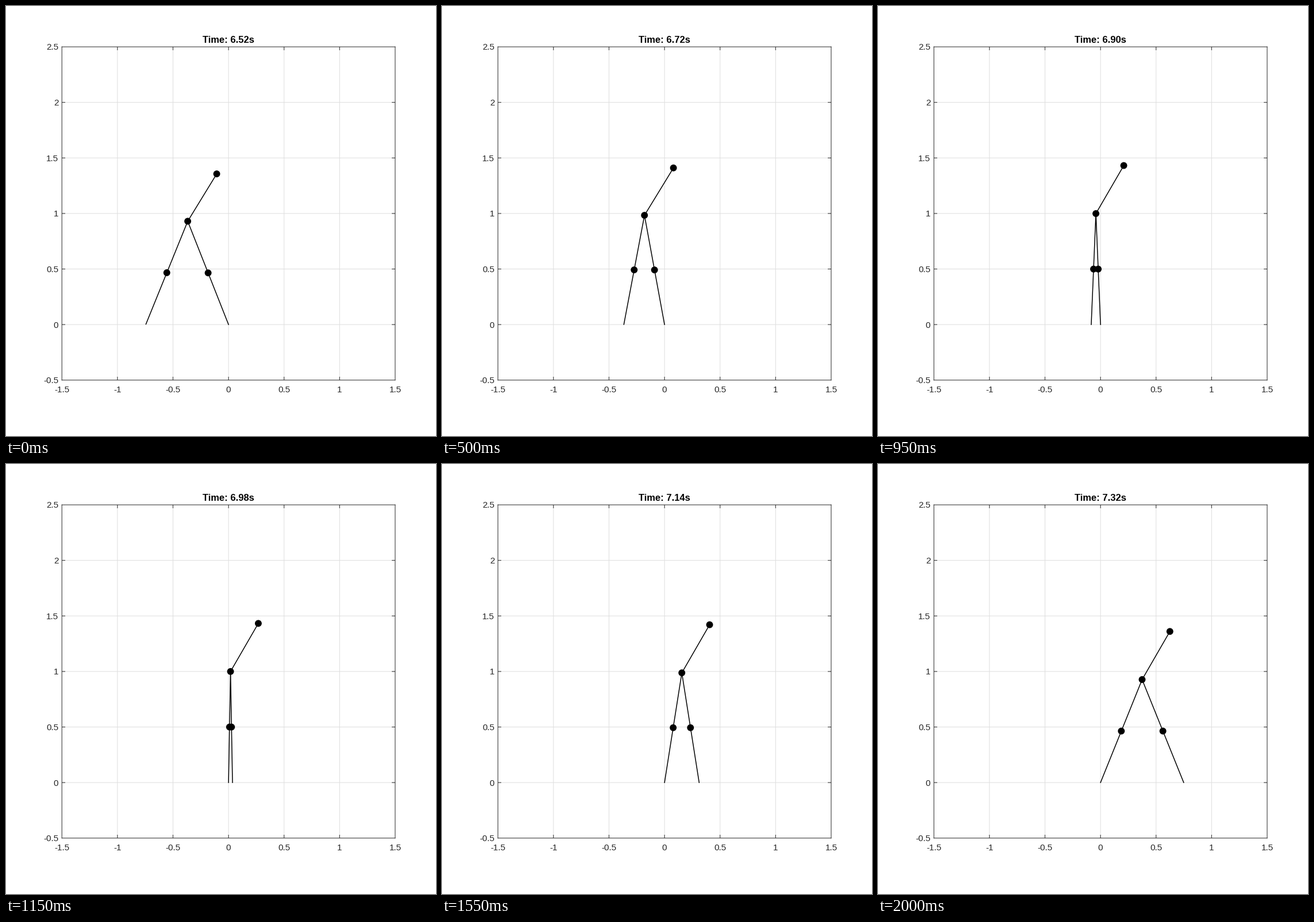
Animation of 748x748 px, one loop 2.05 s. Source, as a matplotlib script:

```python
import numpy as np
import matplotlib.pyplot as plt
from matplotlib.animation import FuncAnimation
from matplotlib.patches import Circle

SIZE, DPI = 748, 100
PX = 72 / DPI                      # one pixel in points
FRAMES, INTERVAL = 41, 50
T0, DT = 6.52, 0.02                # simulated seconds
LEG, TORSO, LEAN = 1.0, 0.5, np.pi / 6
EPS, ALPHA = 0.1, 0.9              # finite-time controller
INK = (0.15, 0.15, 0.15)
FONT = "Liberation Sans"


def power(x, p):
    return np.sign(x) * abs(x) ** p


def settle(y, v, sub=40):
    """Controlled error after every frame, starting at y with rate v."""
    h = DT / EPS / sub
    out = []
    for _ in range(FRAMES):
        out.append(y)
        for _ in range(sub):
            phi = y + power(v, 2 - ALPHA) / (2 - ALPHA)
            v -= h * (power(v, ALPHA) + power(phi, ALPHA / (2 - ALPHA)))
            y += h * v
    return np.array(out)


# Stance leg swings over the fixed foot like an inverted pendulum
keys = [0, 6, 15, 23, 31, 35, 40]
angles = [-21.55, -14.53, -5.79, 1.01, 8.99, 14.04, 21.99]
stance = np.radians(np.polynomial.Polynomial.fit(keys, angles, 5)(np.arange(FRAMES)))
swing = settle(0.0096, 0.035) - stance
torso = LEAN + settle(0.0257, 0.128)


def polar(angle, length):
    return length * np.array([np.sin(angle), np.cos(angle)])


fig = plt.figure(figsize=(SIZE / DPI, SIZE / DPI), dpi=DPI, facecolor="white")
ax = fig.add_axes([0.13, 0.13, 0.775, 0.775])
ax.set(xlim=(-1.5, 1.5), ylim=(-0.5, 2.5), xticks=[], yticks=[])
for spine in ax.spines.values():
    spine.set(color=INK, linewidth=PX, snap=False)

# Grid and inward ticks, left unsnapped so they fall between pixels
xticks, yticks = np.arange(-1.5, 1.6, 0.5), np.arange(-0.5, 2.6, 0.5)
TICK = 0.03


def rules(draw_lines, at, start, end, color):
    draw_lines(at, start, end, color=color, linewidth=PX, snap=False, zorder=1)


for draw_lines, at, lo, hi in ((ax.vlines, xticks[1:-1], -0.5, 2.5),
                               (ax.hlines, yticks[1:-1], -1.5, 1.5)):
    rules(draw_lines, at, lo, hi, "0.8725")
    rules(draw_lines, at, lo, lo + TICK, INK)
    rules(draw_lines, at, hi - TICK, hi, INK)


def label(x, y, text, ha="center", size=15.3, **style):
    """Text with its baseline at pixel (x, y), y counted from the top."""
    return fig.text(x / SIZE, 1 - y / SIZE, text, ha=ha, va="baseline",
                    fontname=FONT, fontsize=size * PX, **style)


left, low, span = 0.13 * SIZE, 0.87 * SIZE, 0.775 * SIZE
for i, (x, y) in enumerate(zip(xticks, yticks)):
    step = i * span / 6
    label(left + step, 672, f"{x:g}", color=INK)
    label(91.3, low - step + 5.4, f"{y:g}", ha="right", color=INK)
title = label(387, 64, "", size=16.5, weight="bold", color="black")

limb = dict(color="black", linewidth=1.5 * PX, solid_capstyle="projecting", zorder=3)
body, = ax.plot([], [], **limb)
prop, = ax.plot([], [], **limb)
masses = [ax.add_patch(Circle((0, 0), 0.0308, facecolor="black", linewidth=0, zorder=4))
          for _ in range(4)]
ax.set(xlim=(-1.5, 1.5), ylim=(-0.5, 2.5))


def draw(i):
    hip = polar(stance[i], LEG)
    foot = hip - polar(swing[i], LEG)
    head = hip + polar(torso[i], TORSO)
    body.set_data(*np.array([head, hip, foot]).T)
    prop.set_data([0, hip[0]], [0, hip[1]])
    for mass, spot in zip(masses, (head, hip, hip / 2, (hip + foot) / 2)):
        mass.center = tuple(spot)
    title.set_text(f"Time: {T0 + DT * i:.2f}s")
    return [body, prop, title, *masses]


anim = FuncAnimation(fig, draw, frames=FRAMES, interval=INTERVAL,
                     repeat=True, repeat_delay=0, blit=False)
plt.show()
```
